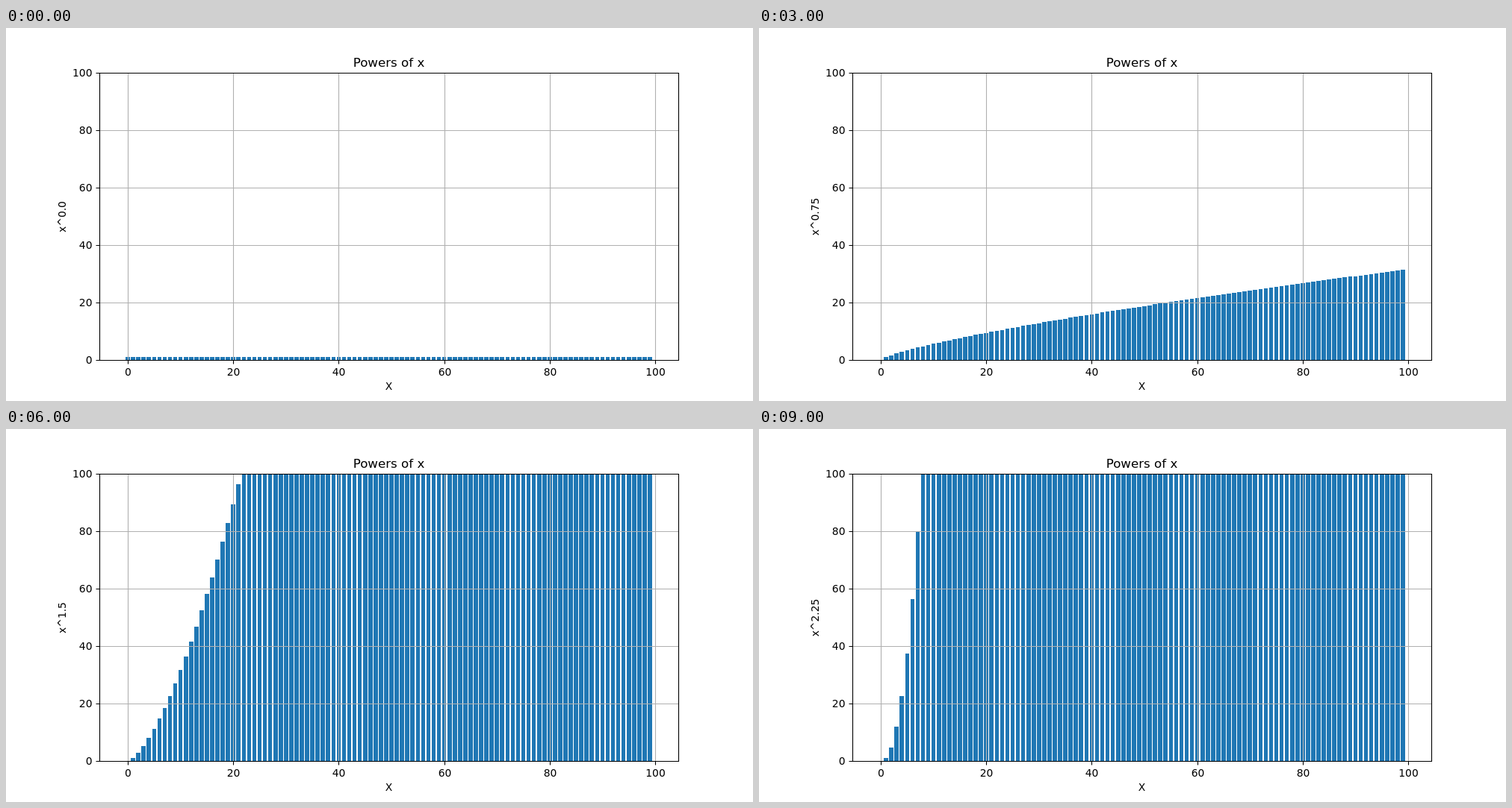
An HTML page for the animation above (10 s loop, 1000x500 px).

```html
<!DOCTYPE html>
<html lang="en">
<head>
<meta charset="utf-8">
<title>Powers of x</title>
<style>
  html, body { margin: 0; width: 100%; height: 100%; overflow: hidden; background: #fff; }
  svg { display: block; }
  text { font: 13.889px "DejaVu Sans", sans-serif; fill: #000; text-anchor: middle; }
  .title { font-size: 16.667px; }
  .end { text-anchor: end; }
  .bars { fill: #1f77b4; }
  .grid, .axes { fill: none; stroke-width: 1.111; }
  .grid { stroke: #b0b0b0; }
  .axes { stroke: #000; }
</style>
</head>
<body>
<svg width="1000" height="500" viewBox="0 0 1000 500"></svg>
<script>
const LEFT = 125, RIGHT = 900, TOP = 60, BOTTOM = 445;
const X_MIN = -5.39, X_MAX = 104.39, Y_MAX = 100;
const BAR_COUNT = 100, HALF_BAR = 0.4;
const STEP_MS = 1000, STEPS = 10, POWER_STEP = 0.25;

const svg = document.querySelector('svg');
const xPix = x => Math.round(LEFT + (x - X_MIN) / (X_MAX - X_MIN) * (RIGHT - LEFT));
const yPix = y => Math.round(BOTTOM - y / Y_MAX * (BOTTOM - TOP));

function add(tag, attrs, text = '') {
  const el = document.createElementNS(svg.namespaceURI, tag);
  for (const key in attrs) el.setAttribute(key, attrs[key]);
  el.textContent = text;
  return svg.appendChild(el);
}

const bars = add('path', { class: 'bars' });

let grid = '';
let axes = `M${LEFT + 0.5} ${TOP + 0.5}H${RIGHT + 0.5}V${BOTTOM + 0.5}H${LEFT + 0.5}Z`;
for (let v = 0; v <= 100; v += 20) {
  const x = xPix(v) + 0.5, y = yPix(v) + 0.5;
  grid += `M${x} ${TOP}V${BOTTOM}M${LEFT} ${y}H${RIGHT}`;
  axes += `M${x} ${BOTTOM + 0.5}v5M${LEFT + 0.5} ${y}h-5`;
  add('text', { x, y: 466 }, v);
  add('text', { x: 115.5, y: y + 4.5, class: 'end' }, v);
}
add('path', { class: 'grid', d: grid });
add('path', { class: 'axes', d: axes });

add('text', { x: 512.5, y: 52, class: 'title' }, 'Powers of x');
add('text', { x: 512.5, y: 485 }, 'X');
const yLabel = add('text', { transform: 'translate(80 253) rotate(-90)' });

function barPath(power) {
  let d = '';
  for (let i = 0; i < BAR_COUNT; i++) {
    const y = Math.max(TOP, yPix(i ** power));
    if (y < BOTTOM) d += `M${xPix(i - HALF_BAR)} ${BOTTOM}V${y}H${xPix(i + HALF_BAR)}V${BOTTOM}Z`;
  }
  return d;
}

let shown = -1;
function draw(step) {
  if (step === shown) return;
  shown = step;
  const power = step * POWER_STEP;
  bars.setAttribute('d', barPath(power));
  yLabel.textContent = 'x^' + (Number.isInteger(power) ? power.toFixed(1) : power);
}

const start = performance.now();
function tick() {
  draw(Math.floor((performance.now() - start) / STEP_MS) % STEPS);
  requestAnimationFrame(tick);
}
tick();
</script>
</body>
</html>
```
